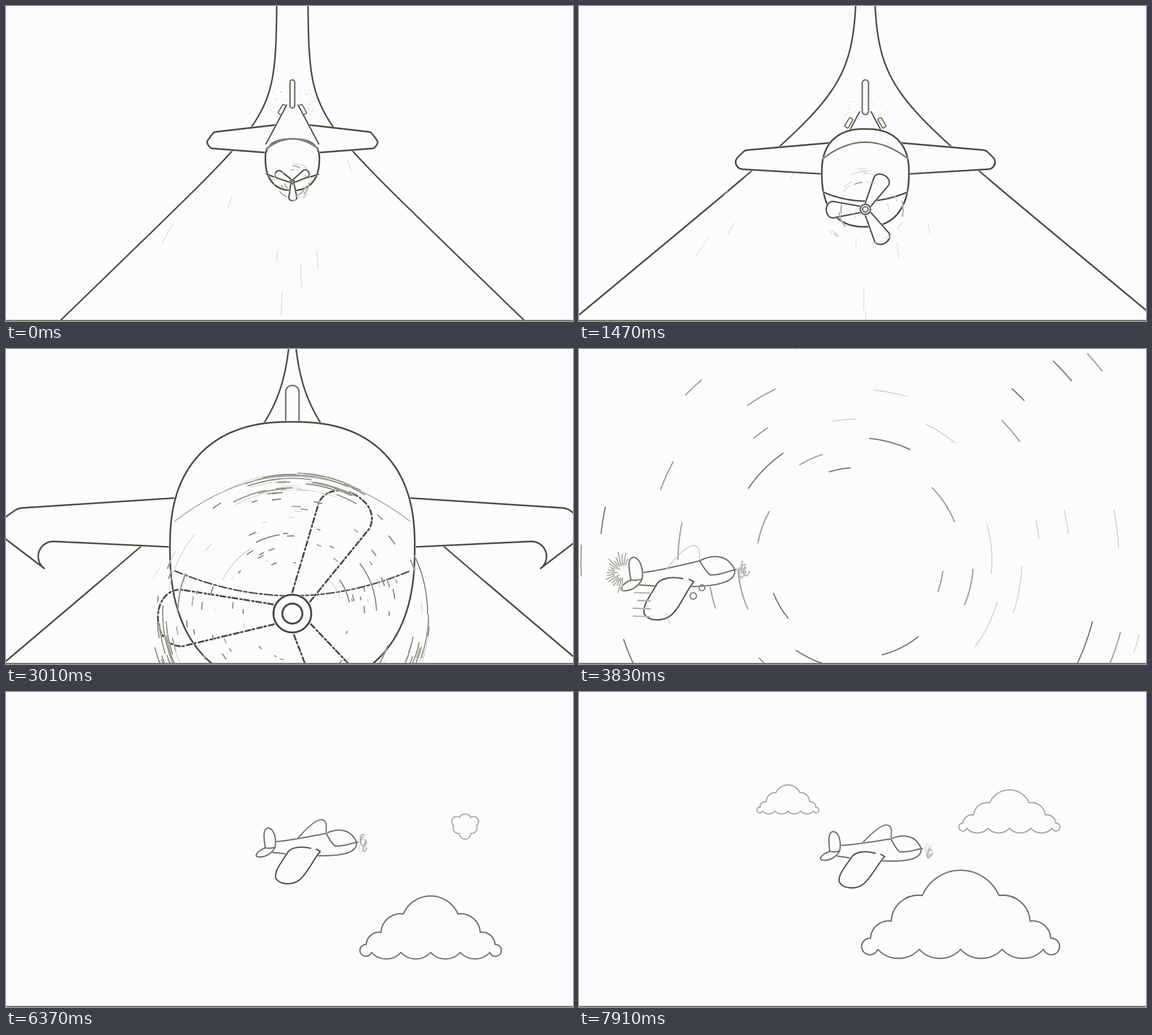
Write an HTML page with a canvas that moves like this. It is 988x550 px and loops after 8 s.

```html
<!DOCTYPE html>
<html lang="en">
<head>
<meta charset="utf-8">
<title>Sketched plane</title>
<style>
html, body { margin: 0; width: 100%; height: 100%; overflow: hidden; background: #fcfcfe }
canvas { display: block }
</style>
</head>
<body>
<canvas id="stage" width="988" height="550"></canvas>
<script>
const ctx = document.getElementById('stage').getContext('2d');
const PAPER = '#fcfcfe', DARK = '#45453c', MID = '#66665a', SOFT = '#96968a', PALE = '#cdcdc0', EDGE = '#d8d8d0';
const TAU = Math.PI * 2, RAD = Math.PI / 180;
const LOOP = 8000, CUT = 3530, BEAT = 840, PAUSE = 100;

const lerp = (a, b, k) => a + (b - a) * k;
const progress = (t, from, to) => Math.max(0, Math.min(1, (t - from) / (to - from)));
const easeOut = k => 1 - (1 - k) ** 2;

function random(seed) {
  let s = seed * 2654435761 >>> 0;
  return (lo = 0, hi = 1) => {
    s = s + 0x6D2B79F5 >>> 0;
    let v = Math.imul(s ^ s >>> 15, 1 | s);
    v ^= v + Math.imul(v ^ v >>> 7, 61 | v);
    return lo + (hi - lo) * ((v ^ v >>> 14) >>> 0) / 4294967296;
  };
}

// Pencil line: soft edge below a darker core
function ink(path, width = 2, color = DARK, fill = false, scale = 1) {
  if (fill) { ctx.fillStyle = PAPER; ctx.fill(path); }
  ctx.lineCap = ctx.lineJoin = 'round';
  if (color !== PALE) {
    ctx.strokeStyle = EDGE;
    ctx.lineWidth = (width + 1.5) / scale;
    ctx.stroke(path);
  }
  ctx.strokeStyle = color;
  ctx.lineWidth = width / scale;
  ctx.stroke(path);
}

function poly(pts) {
  const p = new Path2D();
  pts.forEach(([x, y]) => p.lineTo(x, y));
  return p;
}

function rounded(pts, r) {
  const p = new Path2D();
  p.moveTo(...pts[0]);
  for (let i = 1; i < pts.length - 1; i++) p.arcTo(...pts[i], ...pts[i + 1], r);
  p.lineTo(...pts[pts.length - 1]);
  return p;
}

function ring(x, y, r, from = 0, to = TAU) {
  const p = new Path2D();
  p.arc(x, y, Math.max(r, 0), from, to);
  return p;
}

/* Plane coming towards the viewer */

function approach(t) {
  // Perspective: the distances to nose and wing shrink evenly
  const size = 1 / (0.02128 - 0.00000551 * t), span = 1 / (0.00666 - 0.00000158 * t);
  const near = size > 130, step = Math.floor(t / 40), rnd = random(step + 1);
  // Value for a far, middle and near plane
  const key = (a, b, c) => size < 77 ? lerp(a, b, (size - 47) / 30) : lerp(b, c, (size - 77) / 135);
  const both = draw => [-1, 1].forEach(draw);

  const finTop = key(129, 129, 64), finEnd = key(178, 190, 150), finW = 2 + size * 0.045;
  const bodyTop = key(232, 214, 128), bodyMid = key(265, 292, 345), bodyEnd = key(322, 388, 590);
  const wingTop = key(208, 239, 255), chord = size * 0.26 + 36;
  const hubY = key(307, 357, 461), hubR = (size - 25) * 0.175;
  const blade = size * 1.22 - 24, tipW = blade * 0.21, rootW = hubR * 0.5 + 1;

  ctx.save();
  ctx.translate(499, 0);

  // Runway edge: a straight strip that bends softly outwards
  const strip = key(27, 14, 0), bend = key(183, 135, 122), slope = key(1.03, 1.21, 1.18), soft = key(38, 45, 55);
  both(s => {
    const edge = new Path2D();
    for (let y = 0; y <= 550; y += 5) edge.lineTo(s * (strip + slope * soft * Math.log(1 + Math.exp((y - bend) / soft))), y);
    ink(edge, 2.3);
  });
  for (let i = 0; i < 10; i++) {
    const a = rnd(0.29, 0.71) * Math.PI, d = rnd(280, 600), end = d * rnd(1.03, 1.09);
    const [c, s] = [Math.cos(a), Math.sin(a)];
    ink(poly([[c * d, s * d], [c * end, s * end]]), 1, PALE);
  }

  both(s => {
    const at = (x, k) => [s * x, wingTop + chord * k];
    ink(rounded([at(size * 0.4, -0.03), at(span * 0.91, 0.25), at(span, 0.62), at(span * 0.95, 0.84), at(size * 0.9, 1)], span * 0.05), 2.4, DARK, true);
  });

  // Tail
  if (!near) {
    both(s => {
      ctx.save();
      ctx.translate(s * size * 0.38, finEnd + (size - 40) * 0.4);
      ctx.rotate(-s * 30 * RAD);
      const p = new Path2D();
      p.roundRect(-3.5, -9, 7, 18, 2);
      ink(p, 1.6, MID, true);
      ctx.restore();
    });
    ctx.fillStyle = PALE;
    for (let i = 0; i < 40; i++) ctx.fillRect(rnd(-42, 42), finEnd + rnd(-32, 12), 1.5, 1.5);
  }
  const coneTop = finEnd - 5;
  ctx.fillStyle = PAPER;
  ctx.fill(poly([[-10, coneTop], [10, coneTop], [46, coneTop + 68], [-46, coneTop + 68]]));
  both(s => ink(poly([[s * 10, coneTop], [s * 46, coneTop + 68]]), 1.8));
  const fin = new Path2D();
  fin.roundRect(-finW, finTop, finW * 2, finEnd - finTop, finW);
  ink(fin, 2, MID, true);

  // Body: squared ellipse, taller below its widest line
  const power = v => Math.sign(v) * Math.abs(v) ** (2 / 2.4), body = new Path2D();
  for (let a = 0; a < TAU; a += 0.05) {
    const s = Math.sin(a);
    body.lineTo(size * power(Math.cos(a)), bodyMid + power(s) * (s < 0 ? bodyMid - bodyTop : bodyEnd - bodyMid));
  }
  body.closePath();
  ink(body, 2.5, DARK, true);
  const seam = (mid, sag) => {
    const p = new Path2D();
    for (let u = -0.96; u <= 0.97; u += 0.08) p.lineTo(u * size, mid + sag * u * u);
    return p;
  };
  ink(seam(key(232, 238, 222), size * 0.4), near ? 1 : 2, near ? SOFT : MID);
  if (near) ctx.setLineDash([14, 4, 5, 4]);
  ink(seam(key(303, 342, 430), -size * 0.22), 2.2);
  ctx.setLineDash([]);

  // Propeller with smears behind the tips
  ctx.translate(0, hubY);
  for (let i = 0; i < 3; i++) {
    const a = (88 + 0.3885 * t) * RAD + i * TAU / 3;
    const p = new Path2D();
    p.moveTo(hubR, -rootW);
    p.lineTo(blade * 0.82, -tipW);
    p.bezierCurveTo(blade * 1.05, -tipW, blade * 1.05, tipW, blade * 0.82, tipW);
    p.lineTo(hubR, rootW);
    ctx.save();
    ctx.rotate(a);
    if (near) ctx.setLineDash([9, 5, 3, 4]);
    ink(p, near ? 2.8 : 2, DARK, !near);
    ctx.restore();
    for (let j = 0; j < (near ? 34 : 4); j++) {
      const to = a + rnd(-0.7, 0.1), r = blade * rnd(0.9, 1.05);
      ink(ring(0, 0, r, to - rnd(0.05, 0.35), to), 1.1, near && rnd() < 0.7 ? MID : PALE);
    }
  }
  for (let i = 0; i < (near ? 130 : 14); i++) {
    const a = rnd(0, TAU), r = blade * Math.sqrt(rnd(0.1, 1.05));
    const sweep = rnd() < 0.1 ? rnd(0.3, 0.8) : rnd(0.03, near ? 0.1 : 0.45);
    ink(ring(0, 0, r, a, a + sweep), 1.2, near && rnd() < 0.6 ? MID : rnd() < 0.5 ? SOFT : PALE);
  }
  ink(ring(0, 0, hubR), near ? 3 : 2, DARK, true);
  ink(ring(0, 0, hubR * 0.53), near ? 3 : 1.6);
  ctx.restore();
}

/* Slipstream: arcs spread along a spiral, turning, widening and fading out */

function slipstream(t) {
  const dt = t - 3830, rnd = random(7);
  for (let i = 0; i < 62; i++) {
    const r = 150 + i * 6.5, a = i * 2.4 + rnd(-0.3, 0.3) + dt * 0.0006;
    const end = rnd(4100, 4700), tone = rnd(), half = rnd(10, 45) / r * progress(t, end, end - 250);
    if (half) ink(ring(485, 370, r * (1 + dt * 0.0004), a - half, a + half), 1.5, tone < 0.25 ? MID : tone < 0.65 ? SOFT : PALE);
  }
}

/* Plane seen from the side, nose at 558, 271 */

const HULL = new Path2D('M416 280C440 277 470 268 503 259C520 249 545 246 557 271C560 290 530 297 490 299M412 299L438 300M503 259Q512 274 520 280C535 280 545 274 559 270');
const TAIL = new Path2D('M399 292C394 270 393 258 402 257C412 258 418 275 416 290Q408 293 399 292C390 296 382 304 385 308C395 311 410 304 416 290');
const FAR_WING = new Path2D('M453 273C470 250 485 234 495 236C504 238 502 250 503 258');
const NEAR_WING = new Path2D('M478 287C460 284 443 288 438 298C428 318 418 330 421 343C428 355 450 354 462 344C475 332 482 310 495 291L488 288');

function sidePlane(t) {
  const rnd = random(Math.floor(t / 40)), rush = t < 4500;
  const settle = Math.exp((3830 - t) / 500), glide = Math.exp((3830 - t) / 770);
  const drift = easeOut(progress(t, 6370, 7910)), scale = 1 + 0.14 * settle;
  const tilt = 2 * settle + 7 * (1 - Math.exp(-Math.max(0, t - 5110) / 1380));
  const pen = (path, w, color) => ink(path, w, color, false, scale);

  ctx.save();
  ctx.translate(625 - 353 * glide - 26 * drift, 262 + 124 * settle + 12 * drift);
  ctx.scale(scale, scale);
  ctx.rotate(tilt * RAD);
  ctx.translate(-558, -271);
  pen(HULL, 1.8, MID);
  pen(TAIL, 1.8, MID);
  pen(FAR_WING, 1.6, rush ? PALE : MID);
  pen(NEAR_WING, 1.9, DARK);
  for (let i = 0; i < 6; i++) {
    const p = new Path2D();
    p.ellipse(570 + rnd(-5, 5), 270 + rnd(-11, 11), rnd(2, 5), rnd(5, 11), rnd(-0.3, 0.3), 0, rnd(3, 6));
    pen(p, 1.1, i % 2 ? PALE : SOFT);
  }
  if (rush) {
    pen(ring(495, 313, 5), 1.4, MID);
    pen(ring(508, 300, 4.5), 1.4, MID);
    for (let y = 311; y < 350; y += 12) pen(poly([[412 - rnd(0, 10), y], [430, y]]), 1.2, SOFT);
    for (let a = 90; a < 290; a += 11) {
      const [c, s] = [Math.cos(a * RAD), Math.sin(a * RAD)], from = rnd(6, 14), to = rnd(20, 32);
      pen(poly([[386 + c * from, 281 + s * from], [386 + c * to, 281 + s * to]]), 1.1, SOFT);
    }
  }
  ctx.restore();
}

/* Clouds */

// Closed outline of lobes bulging out between corners
function lobes(corners, bulge) {
  return new Path2D('M' + corners[0] + corners.map((p, i) => {
    const q = corners[(i + 1) % corners.length], k = bulge(i);
    const r = Math.hypot(q[0] - p[0], q[1] - p[1]) * (0.25 + k * k) / (2 * k);
    return `A${r} ${r} 0 ${+(k > 0.5)} 1 ${q}`;
  }).join(''));
}

// Six corners climb over the top, five return along the base
function cloud(x, y, w, h, width, color) {
  const top = [-0.87, -0.67, -0.37, 0.37, 0.67, 0.87].map(u => [u, 0.39 - 0.95 * (1 - Math.abs(u))]);
  const base = [0.8, 0.4, 0, -0.4, -0.8].map(u => [u, 0.39]);
  const corners = [...top, ...base].map(([u, v]) => [x + u * w / 2, y + v * h]);
  ink(lobes(corners, i => i % 5 ? i === 2 ? 0.33 : 0.22 : i ? 1 : 0.22), width, color);
}

function puff(x, y, r) {
  const corners = Array.from({ length: 6 }, (_, i) => [x + r * Math.cos(i * TAU / 6), y + r * 0.8 * Math.sin(i * TAU / 6)]);
  ink(lobes(corners, i => i % 2 ? 0.5 : 0.3), 1.1, SOFT);
}

function clouds(t) {
  if (t > 5650) {
    const grow = easeOut(progress(t, 5640, 6370)), k = progress(t, 6370, 7910);
    const w = lerp(258, 361, k) * grow;
    cloud(lerp(740, 665, k), lerp(lerp(450, 411, grow), 388, k), w, w * 0.435, 1.8, MID);
  }
  if (t > 6490) {
    const k = progress(t, 6490, 7910), w = lerp(60, 186, easeOut(k));
    cloud(lerp(815, 750, k), lerp(232, 209, easeOut(k)), w, w * 0.4, 1.2, SOFT);
  } else if (t > 6050) puff(800, 233, 20 * easeOut(progress(t, 6000, 6370)));
  if (t > 6750) {
    const k = progress(t, 6750, 7910), w = lerp(40, 112, easeOut(k));
    cloud(lerp(425, 364, k), lerp(203, 187, k), w, w * 0.48, 1.2, SOFT);
  }
}

function frame(clock) {
  // The drawing rests for a moment on every beat
  const phase = (clock + BEAT - 70) % BEAT, t = Math.max(0, phase < PAUSE ? clock - phase : clock);
  ctx.fillStyle = PAPER;
  ctx.fillRect(0, 0, 988, 550);
  if (t < CUT) approach(t);
  else {
    if (t < 4700) slipstream(t);
    clouds(t);
    sidePlane(t);
  }
  ctx.fillStyle = '#74746a';
  ctx.fillRect(0, 548, 988, 2);
}

const start = performance.now();
(function tick() {
  frame((performance.now() - start) % LOOP);
  requestAnimationFrame(tick);
})();
</script>
</body>
</html>
```
